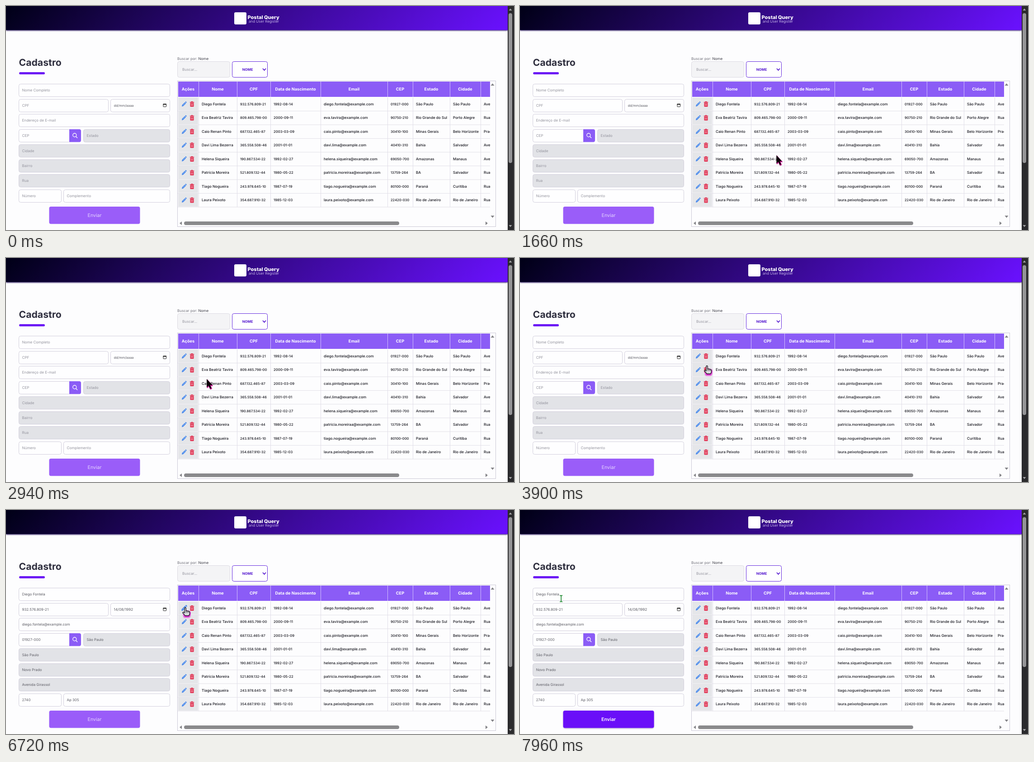
Write an HTML page that moves like this. It is 1124x498 px and loops after 8000 ms.

```html
<!DOCTYPE html>
<html lang="pt-BR">
<head>
<meta charset="utf-8">
<title>Cadastro</title>
<style>
html, body { margin: 0; width: 100%; height: 100%; overflow: hidden; background: #fdfdfe; }
svg { display: block; width: 1124px; height: 498px; font-family: Inter, "Open Sans", sans-serif; }
</style>
</head>
<body>
<svg id="stage" viewBox="0 0 1124 498" text-rendering="geometricPrecision">
  <defs>
    <linearGradient id="bar" gradientUnits="userSpaceOnUse" x1="264" y1="-264" x2="846" y2="317">
      <stop stop-color="#000016"/><stop offset="1" stop-color="#6a11ff"/>
    </linearGradient>
    <filter id="blur" x="-10%" y="-40%" width="120%" height="180%"><feGaussianBlur stdDeviation="1.4"/></filter>
    <clipPath id="view"><rect x="380" y="167" width="691" height="310"/></clipPath>
    <g id="pencil" fill="#3f83ea">
      <path d="M-5 5.5L-4.2 1.8L1.7 -4.1L4.2 -1.6L-1.7 4.4Z"/>
      <path d="M2.3 -4.7L3.2 -5.5Q4.1 -6 5 -5.1T5.4 -3.1L4.7 -2.2Z"/>
      <path d="M-2.8 2.8L2.2 -2.2" stroke="#cfe0fb" stroke-width=".8"/>
    </g>
    <g id="trash" fill="#df2547">
      <path d="M-4.7 -4.7H-2L-1.4 -6H1.4L2 -4.7H4.7V-3.2H-4.7Z"/>
      <path d="M-4 -2.5H4V4.8Q4 6 2.8 6H-2.8Q-4 6 -4 4.8Z"/>
      <path d="M-1.9 -.8V4.3M0 -.8V4.3M1.9 -.8V4.3" stroke="#f7cdd5" stroke-width=".8"/>
    </g>
  </defs>
  <g id="page"></g>
  <g id="empty"></g>
  <g id="filled"></g>
  <g id="send"></g>
  <g id="arrow">
    <path d="M1 1V20L5 16.5L8 23L11.5 21.5L8.8 15H13.5Z" fill="#c4138f" stroke="#c4138f"/>
    <path d="M0 0V18.5L4.3 14.6L7.4 21.5L10.2 20.2L7.2 13.5H12.3Z" fill="#0a0006"/>
  </g>
  <g id="hand" stroke-linejoin="round">
    <path d="M-4 13L-2 20H8L10.500 15V10L3 8Z" fill="#e01bd0" stroke="#e01bd0" stroke-width="3" filter="url(#blur)"/>
    <path d="M-2 1Q-2 -.5 -.5 -.5T1.2 1V7Q3 5.8 4.4 7.2Q6 6.3 7.3 7.9Q9.5 7.3 9.500 10V13Q9 15.500 7.600 17.500H-.6Q-3 14 -6 11.4Q-6.3 9.3 -4.2 9.5L-2 11.3Z" fill="#d9d9dd" stroke="#17131a" stroke-width="1.3"/>
    <path d="M1.4 7V11M4.4 7.5V11M7.3 8V11" fill="none" stroke="#17131a" stroke-width=".9"/>
  </g>
  <path id="beam" d="M-3 -7H-1.3L0 -6L1.3 -7H3M0 -6V6M-3 7H-1.3L0 6L1.3 7H3" fill="none" stroke="#16852a" stroke-width="1.6"/>
</svg>
<script>
const $ = id => document.getElementById(id);
const PURPLE = '#8b5cf6', EDGE = '#d2cfdc', LOOP = 8000, FILL = 6720;

const text = (s, x, y, size = 8.1, color = '#22222a', weight = 400, anchor = 'start') =>
  `<text x="${x}" y="${y + size * .36}" font-size="${size}" fill="${color}" font-weight="${weight}" text-anchor="${anchor}">${s}</text>`;
const rect = (x, y, w, h, fill, rx = 0, stroke = 'none') =>
  `<rect x="${x}" y="${y}" width="${w}" height="${h}" fill="${fill}" rx="${rx}" stroke="${stroke}"/>`;
const path = (d, fill, stroke = 'none', width = 1) =>
  `<path d="${d}" fill="${fill}" stroke="${stroke}" stroke-width="${width}"/>`;

// Header and page scrollbar
let page = '<rect y="4" width="1110" height="50.500" fill="#1d0b55" filter="url(#blur)"/>'
  + rect(0, 0, 1110, 53.5, 'url(#bar)')
  + rect(505, 14, 27, 27, '#fff', 3)
  + text('Postal Query', 534.5, 25, 11, '#fff', 800)
  + text('and User Register', 537, 34.5, 8.1, '#e9e2ff', 300)
  + rect(1110, 0, 14, 498, '#2b2b2d') + rect(1112, 16, 8, 333, '#959597', 4)
  + path('M1112.500 10L1116 5.500L1119.500 10ZM1112.500 487L1116 491.500L1119.500 487Z', '#a3a3a5');

// Form
page += text('Cadastro', 28.5, 125, 21.2, '#2f2f3f', 700) + rect(29, 147, 57, 5, '#6d1bf5', 2.5);
const fields = [
  [28, 173, 335, 'Nome Completo', 'Diego Fontela'],
  [28, 207, 199, 'CPF', '932.576.809-21'],
  [231, 207, 132, 'dd/mm/aaaa', '14/08/1992'],
  [28, 240, 335, 'Endereço de E-mail', 'diego.fontela@example.com'],
  [28, 274, 115, 'CEP', '01927-000'],
  [171, 274, 192, 'Estado', 'São Paulo', 1],
  [28, 307.5, 335, 'Cidade', 'São Paulo', 1],
  [28, 341, 335, 'Bairro', 'Novo Prado', 1],
  [28, 374, 335, 'Rua', 'Avenida Girassol', 1],
  [28, 408, 95, 'Número', '2740'],
  [127, 408, 236, 'Complemento', 'Ap 305']
];
let empty = '', filled = '';
for (const [x, y, w, hint, value, off] of fields) {
  const isDate = hint[0] === 'd';
  page += rect(x + .5, y + .5, w - 1, 28, off ? '#e2e3e7' : '#fefeff', 4, EDGE);
  empty += text(hint, x + 7.5, y + 14.3, isDate ? 7.4 : 8.1, isDate ? '#5c5c64' : '#94949e');
  filled += text(value, x + 7.5, y + 14.3, isDate ? 8.1 : 7.9, '#5c5c64');
}
page += rect(348, 218, 6.5, 6, '#fff', .5, '#222') + rect(347.5, 217.5, 7.5, 2, '#222')
  + path('M140 274H162Q166 274 166 278V298Q166 302.500 162 302.500H140Z', PURPLE)
  + '<circle cx="151.800" cy="287" r="4" fill="none" stroke="#fff" stroke-width="1.300"/>'
  + path('M154.700 290L158 293.500', 'none', '#fff', 1.4);

// Search
page += text('Buscar por: <tspan fill="#3c3c46">Nome</tspan>', 379, 117.5, 8.1, '#70707a')
  + rect(379.5, 123.5, 116, 35, '#f4f4f6', 4, '#dcdae2') + text('Buscar...', 390, 141.5, 8.1, '#94949e')
  + rect(500.5, 123.5, 78, 35, '#fff', 4, '#6126dc') + text('NOME', 534.5, 141.5, 7.7, '#5417cf', 700, 'middle')
  + path('M568 139L571.500 142.800L575 139', 'none', '#5417cf', 1.8);

// Table
const cols = [380, 426, 511, 585, 696, 844, 900, 982, 1050];
const heads = ['Ações', 'Nome', 'CPF', 'Data de Nascimento', 'Email', 'CEP', 'Estado', 'Cidade'];
const people = `Diego Fontela|932.576.809-21|1992-08-14|diego.fontela|01927-000|São Paulo|São Paulo|Avenida
Eva Beatriz Tavira|809.465.798-00|2000-09-11|eva.tavira|90750-210|Rio Grande do Sul|Porto Alegre|Rua
Caio Renan Pinto|687.132.465-87|2003-03-09|caio.pinto|30410-100|Minas Gerais|Belo Horizonte|Praça
Davi Lima Bezerra|365.558.508-46|2001-01-01|davi.lima|40410-310|Bahia|Salvador|Avenida
Helena Siqueira|190.867.534-22|1992-02-27|helena.siqueira|69050-700|Amazonas|Manaus|Avenida
Patrícia Moreira|521.809.132-44|1980-05-22|patricia.moreiraa|13759-264|BA|Salvador|Rua
Tiago Nogueira|243.978.645-10|1987-07-19|tiago.nogueira|80100-000|Paraná|Curitiba|Rua
Laura Peixoto|354.687.910-32|1985-12-03|laura.peixoto|22420-030|Rio de Janeiro|Rio de Janeiro|Rua`.split('\n');

page += rect(379.5, 166.5, 704, 324, '#fdfdfe', 0, '#cbc8d6') + '<g clip-path="url(#view)">'
  + rect(381, 168, 690, 34, PURPLE);
heads.forEach((h, i) => page += text(h, (cols[i] + cols[i + 1]) / 2, 184.5, 9.2, '#fff', 700, 'middle'));
people.forEach((line, r) => {
  const y = 218 + r * 30.5;
  page += rect(381, y - 14.5, 44, 29, '#e5e6e9') + rect(380, y + 15, 691, 1, '#e2e0e8')
    + `<use href="#pencil" class="pencil" transform="translate(394 ${y})"/><use href="#trash" transform="translate(411.500 ${y})"/>`;
  line.split('|').forEach((s, i) => {
    const size = i === 1 || i === 4 ? 7.5 : i === 2 ? 7.7 : 8.1;
    page += text(i === 3 ? s + '@example.com' : s, cols[i + 1] + 7, y, size, '#16161e', 450);
  });
});
for (const x of cols.slice(1)) page += rect(x, 168, 1, 34, '#d3c1fd') + rect(x, 203, 1, 244, '#e0dee8');
page += '</g>' + rect(394, 479, 476, 8, '#8a8a8c', 4)
  + path('M1072.500 177L1076.500 172L1080.500 177ZM1072.500 466L1076.500 471L1080.500 466ZM389 479L384 483L389 487ZM1061 479L1066 483L1061 487Z', '#848488');

$('page').innerHTML = page;
$('empty').innerHTML = empty;
$('filled').innerHTML = filled;

// Pointer path: time, x, y
const route = [
  [960, 660, 358], [2080, 512, 316], [2500, 472, 292], [2820, 434, 259], [3060, 454, 279],
  [3340, 434, 247], [3620, 421, 246], [3900, 414, 240], [4480, 409, 235], [4740, 380, 195],
  [5000, 397, 217.5], [7260, 397, 217.5], [7960, 91, 197]
];
function pointer(t) {
  const i = route.findIndex(p => p[0] > t);
  if (i < 0) return route[route.length - 1].slice(1);
  const [t0, x0, y0] = route[i - 1], [t1, x1, y1] = route[i], k = (t - t0) / (t1 - t0);
  return [x0 + (x1 - x0) * k, y0 + (y1 - y0) * k];
}

// The button gains full colour, shadow and bold text as it becomes active
function button(k) {
  return `<rect x="96" y="447" width="200" height="38.500" rx="4" fill="#8d7bb5" opacity="${k * .8}" filter="url(#blur)"/>`
    + `<g opacity="${.67 + .33 * k}">${rect(95.5, 446, 201, 38.5, '#6a0ff8', 4)}</g>`
    + `<g opacity="${.75 + .25 * k}">${text('Enviar', 196, 465, 10.6, '#fff', 400 + 200 * k, 'middle')}</g>`;
}

const show = (id, on) => $(id).style.display = on ? '' : 'none';
const firstPencil = document.querySelector('.pencil');
let lastReady = -1;

function draw(now) {
  const t = now % LOOP, done = t >= FILL;
  show('empty', !done);
  show('filled', done);
  const ready = Math.min(1, Math.max(0, (t - FILL) / 400));
  if (ready !== lastReady) $('send').innerHTML = button(lastReady = ready);

  let kind = '', x = 0, y = 0;
  if (t >= 960) {
    [x, y] = pointer(t);
    kind = x < 363 ? 'beam' : x > 386 && x < 420 && y > 203 ? 'hand' : 'arrow';
  }
  for (const id of ['arrow', 'hand', 'beam']) show(id, id === kind);
  if (kind) $(kind).setAttribute('transform', `translate(${x} ${y})`);
  const hover = kind === 'hand' && x < 402 && y < 227;
  firstPencil.setAttribute('transform', `translate(394 218) scale(${hover ? 1.2 : 1})`);
  requestAnimationFrame(draw);
}
requestAnimationFrame(draw);
</script>
</body>
</html>
```
